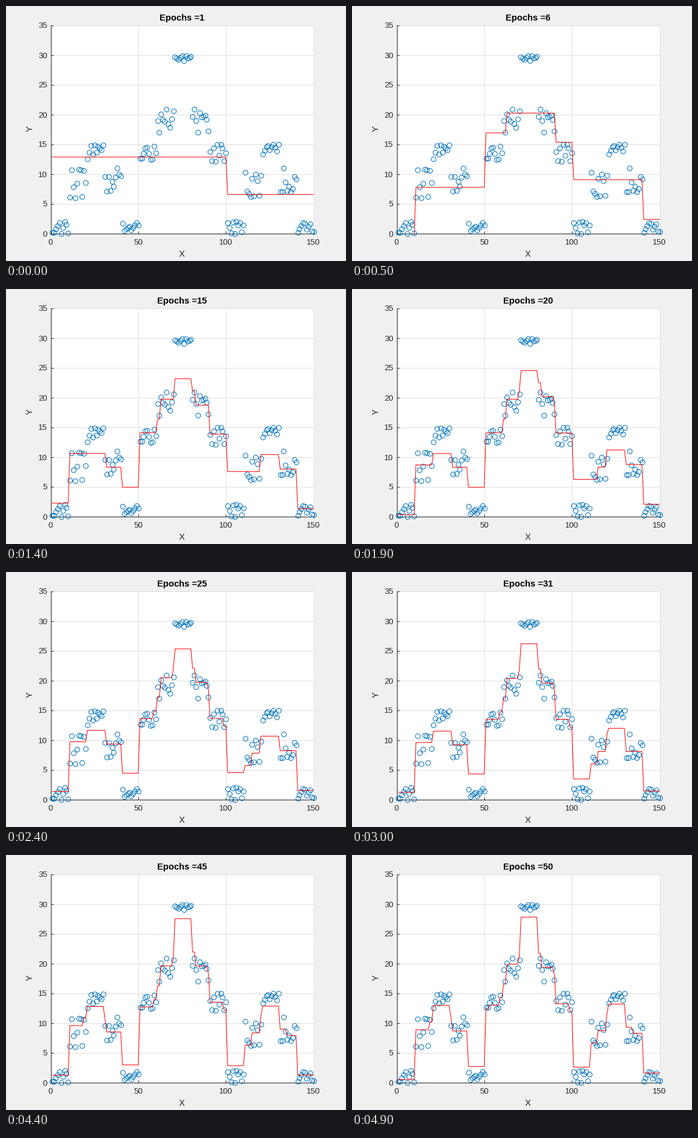
Recreate the animation shown at these times as a matplotlib script. Size 560 by 420 pixels, loop 7.9 s.

```python
import numpy as np
import matplotlib.pyplot as plt
from matplotlib.animation import FuncAnimation

W, H, DPI = 560, 420, 100
EPOCHS, FRAMES, STEP_MS = 50, 79, 100
LEFT, RIGHT, TOP, BOTTOM = 73.5, 506.5, 31.5, 374.5
XMAX, YMAX = 150, 35
INK, BLUE, RED, PALE = "#262626", "#0072BD", "#FF0000", "#DFDFDF"

# Key samples of each ten-point plateau; gaps lie on the line between neighbours
o = np.nan
keys = np.ravel([
    [0.2, 0.2, o, o, 1.8, 0, o, 2, 1.5, 0.1],
    [6.1, 10.7, 7.8, 6, o, 10.8, 10.7, 6.2, 10.6, 8.5],
    [12.5, o, 14.7, 13.3, 14.8, 13.6, 14.6, o, 14, 14.8],
    [9.5, 7.1, 9.5, 7.2, 8.7, 7.9, o, 11, 9.9, 9.6],
    [1.7, 0.5, o, o, 1.2, 0.6, o, o, 1.8, 1.4],
    [12.6, 12.6, o, 14.3, 14.4, o, 12.4, 12.5, 14.6, 13.5],
    [18.9, 17, 20.1, 19.1, 18.8, 20.9, 18.4, 17.8, o, 20.6],
    [29.6, o, 29.2, o, 29.8, 29, 29.8, 29.4, o, 29.7],
    [19.6, 20.9, o, 17, 20.3, 19.5, o, 19.8, 19.1, 17.2],
    [13.7, 12.2, 14.3, 12.1, 14.9, 13.1, 15, 14.3, 12.2, 13.5],
    [1.8, o, 0.1, 1.9, 0, 2, 1.4, 1.8, 0.3, 1.4],
    [10.3, 7.1, o, 6.2, 9.2, 6.3, 9.9, 8.8, 6.4, 9.7],
    [13.3, o, 14.5, 14.7, 14, o, 15, o, 13.8, 14.9],
    [7, 7, 11, 8.6, 7.2, 7.9, 7, 7.5, 9.5, 9.1],
    [0.2, o, o, 1.8, 1.7, 0.7, o, 1.6, 0.4, 0.3],
])
X = np.arange(1, len(keys) + 1)
known = ~np.isnan(keys)
Y = np.interp(X, X[known], keys[known])


def fit_stump(res):
    """Least-squares single split of the residuals."""
    n = X[:-1]
    left = np.cumsum(res)[:-1]
    right = res.sum() - left
    k = n[np.argmax(left**2 / n + right**2 / (len(res) - n))]
    return np.where(X <= k, res[:k].mean(), res[k:].mean())


def boost(y, epochs):
    pred, steps = np.zeros_like(y), []
    for _ in range(epochs):
        pred = pred + fit_stump(y - pred)
        steps.append(pred)
    return steps


def pt(px):
    return px * 72 / DPI


THIN = pt(1)
plt.rcParams["font.family"] = "Liberation Sans"
fig = plt.figure(figsize=(W / DPI, H / DPI), dpi=DPI, facecolor="#F0F0F0")
ax = fig.add_axes((LEFT / W, 1 - BOTTOM / H,
                   (RIGHT - LEFT) / W, (BOTTOM - TOP) / H))


def label(x, y, s, px=13.33, color=INK, ha="center", **kw):
    return fig.text(x / W, 1 - y / H, s, fontsize=pt(px), color=color,
                    ha=ha, **kw)


xticks, yticks = range(0, XMAX + 1, 50), range(0, YMAX + 1, 5)
ax.set(xlim=(0, XMAX), ylim=(0, YMAX), xticks=xticks, yticks=yticks)
ax.set_axisbelow(True)
ax.grid(color=PALE, lw=THIN)
ax.tick_params(direction="in", length=pt(4), width=THIN, color=INK,
               labelbottom=False, labelleft=False)
for side, spine in ax.spines.items():
    dark = side in ("left", "bottom")
    spine.set(lw=THIN, zorder=1 if dark else 0.5)
    spine.set_color(INK if dark else PALE)

for v in xticks:
    label(LEFT + v / XMAX * (RIGHT - LEFT), 393, str(v))
for v in yticks:
    label(68, BOTTOM - v / YMAX * (BOTTOM - TOP) + 5, str(v), ha="right")
BIG = 14.67
label(290, 413, "X", BIG)
label(40, 202, "Y", BIG, rotation=90, va="center")
title = label(290, 24, "", BIG, "black", weight="bold")

ax.plot(X, Y, "o", ms=pt(8), mfc="none", mec=BLUE, mew=THIN,
        clip_on=False, zorder=3)
curve, = ax.plot(X, Y, color=RED, lw=THIN, zorder=4)
fits = boost(Y, EPOCHS)


def draw(i):
    epoch = min(i + 1, EPOCHS)
    curve.set_ydata(fits[epoch - 1])
    title.set_text(f"Epochs ={epoch}")
    return curve, title


anim = FuncAnimation(fig, draw, frames=FRAMES, interval=STEP_MS,
                     repeat=True, repeat_delay=0)
plt.show()
```
